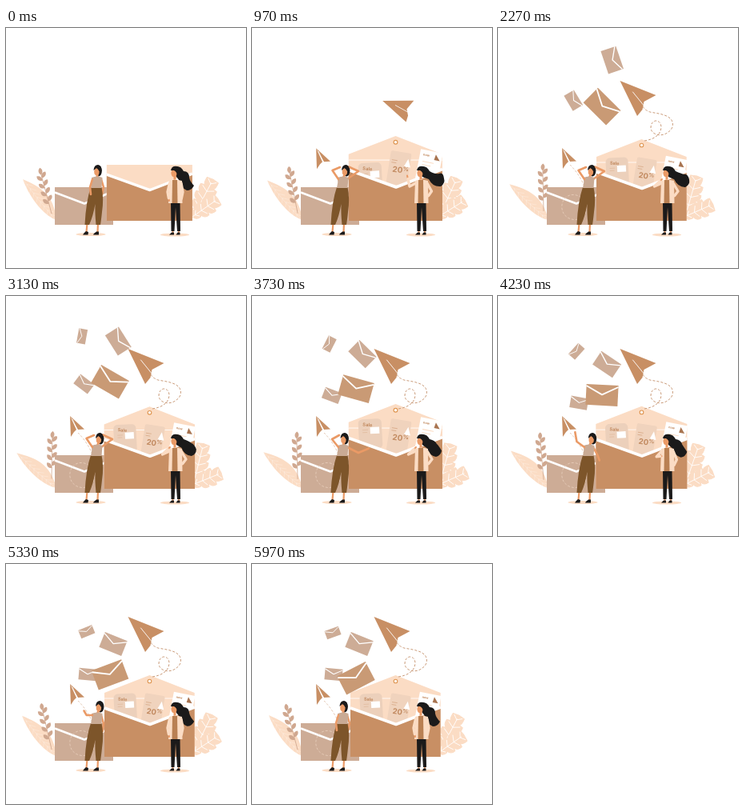
Recreate the animation shown at these times as an HTML page. Size 300 by 300 pixels, loop 6 s.

```html
<!DOCTYPE html>
<html lang="en">
<head>
<meta charset="utf-8">
<title>Mail campaign</title>
<style>
html, body { margin: 0; width: 100%; height: 100%; overflow: hidden; background: #fff; }
svg { display: block; width: 100%; height: 100%; }
text { font-family: Inter, "Open Sans", sans-serif; font-weight: 700; fill: #c28a60; }
</style>
</head>
<body>
<svg id="stage" viewBox="0 0 300 300"></svg>
<script>
const LOOP = 6000;
const TAN = '#c88f64', PALE = '#fbdcc4', DUSTY = '#cdac96', SKIN = '#ea9a66', INK = '#1b1a1a', BROWN = '#7d552a';
const BUTT = 'stroke-linecap="butt"';
const stage = document.getElementById('stage');

const clamp = v => Math.max(0, Math.min(1, v));
const ramp = (t, from, to) => {
  const v = clamp((t - from) / (to - from));
  return v * v * (3 - 2 * v);
};
const bump = (t, center, half) => ramp(t, center - half, center) - ramp(t, center, center + half);
const mix = (a, b, k) => a + (b - a) * k;
const blend = (a, b, k) => a.map((v, i) => mix(v, b[i], k));
const bezier = (a, b, c, d, s) => {
  const r = 1 - s;
  return r * r * r * a + 3 * r * r * s * b + 3 * r * s * s * c + s * s * s * d;
};

const fill = (d, color, extra = '') => `<path d="${d}" fill="${color}" ${extra}/>`;
// Extra attributes come first, so they win over the defaults.
const line = (d, color, width, extra = '') =>
  `<path ${extra} d="${d}" fill="none" stroke="${color}" stroke-width="${width}" stroke-linecap="round" stroke-linejoin="round"/>`;
const oval = (x, y, rx, ry, color) => `<ellipse cx="${x}" cy="${y}" rx="${rx}" ry="${ry}" fill="${color}"/>`;
const group = (transform, body, opacity = 1) => `<g transform="${transform}" opacity="${opacity}">${body}</g>`;

function plume(sway) {
  let ribs = '';
  for (let i = 1; i < 9; i++) {
    const x = 22 + i * 4.3, y = 190 + i * 5.4;
    ribs += `M${x} ${y}l7 2M${x} ${y}l-1 6`;
  }
  return group(`rotate(${-9.3 * sway} 62 240)`,
    fill('M21 189C44 199 60 209 63 240C50 236 31 216 21 189Z', PALE) +
    line('M21 189Q39 214 62 240' + ribs, '#fff', .4, 'opacity=".55"'));
}

function sprig(sway) {
  const color = '#d0a890';
  const leaf = (y, turn) => group(`translate(0 ${y}) rotate(${turn})`, fill('M0 0C-4 -3 -3 -7 0 -9C3 -7 3 -3 0 0Z', color));
  let leaves = leaf(-50, 4);
  for (let y = -13; y > -50; y -= 10) leaves += leaf(y, -42) + leaf(y - 3, 42);
  return group(`translate(57 ${mix(232, 228, sway)}) rotate(${mix(-15, 1, sway)})`, line('M0 0V-50', color, .8) + leaves);
}

function oakLeaf(length, width, lobes) {
  const step = length / lobes;
  const reach = i => width * Math.sin(Math.PI * (i + 1) / (lobes + 1.5));
  let right = '', left = '', veins = `M0 0V${-length * .9}`;
  for (let i = 0; i < lobes; i++) {
    const tip = reach(i), y = -step * (i + .9), notch = i < lobes - 1 ? tip * .55 : 0;
    const edge = side => `Q${side * tip * 1.1} ${y + step * .75} ${side * tip} ${y}L${side * notch} ${-step * (i + 1)}`;
    right += edge(1);
    left += edge(-1);
    veins += `M${-tip * .7} ${y + 1}L0 ${y + step * .5}L${tip * .7} ${y + 1}`;
  }
  return fill(`M0 0${right}L0 ${-length}ZM0 0${left}L0 ${-length}Z`, PALE, `stroke="${PALE}" stroke-linejoin="round"`) +
    line(veins, '#fff', .8);
}

const bush = sway =>
  group(`translate(234 236) rotate(${mix(28, 14, sway)})`, oakLeaf(53, 12, 5)) +
  group(`translate(233 236) rotate(${mix(55, 68, sway)})`, oakLeaf(39, 11, 4));

const smallEnvelope = () =>
  fill('M61 199H134V246H61Z', DUSTY) + line('M61 205.5L98 219.5L134 204', '#fff', 2.6, BUTT);

function cards(t, lift) {
  const slot = (delay, turn, x, body) =>
    group(`translate(0 ${44 * (1 - ramp(t, 250 + delay, 850 + delay)) - lift}) rotate(${turn} ${x} 176)`, body);
  return slot(350, -3, 149,
      '<rect x="135" y="162" width="28" height="36" rx="5" fill="#ecd0bb"/><rect x="149" y="172" width="11" height="8" fill="#fff"/>' +
      '<text x="140" y="170" font-size="5.6" transform="rotate(8 140 170)">Sale</text>' +
      line('M140 175h6M140 178h5', TAN, .5, 'opacity=".5"')) +
    slot(0, 9, 184,
      '<rect x="172" y="163" width="25" height="40" rx="2" fill="#f0d3bd"/>' +
      fill('M190 180l4-10 4 10Z', '#fff') + line('M175 174h6M175 177h5', TAN, .8, 'opacity=".6"') +
      '<text x="177" y="188" font-size="9.5">20<tspan dy="-3" font-size="7">%</tspan></text>') +
    slot(0, 11, 220,
      '<rect x="207" y="162" width="27" height="46" fill="#fff"/><text x="211" y="169" font-size="3.8">now</text>' +
      fill('M226 165L232 172H225Z', '#a87450') + line('M212 176h13M212 180h10', PALE, 1));
}

function bigEnvelope(t) {
  const pulse = bump(t, 970, 700) + bump(t, 3720, 800);
  const scale = .95 + .05 * ramp(t, 0, 500) + .04 * pulse;
  const open = ramp(t, 80, 560);
  const flap = group(`translate(0 168) scale(1 ${open})`,
    fill('M123 0V-7L179.5 -29L235.7 -7V0Z', PALE) +
    '<circle cx="179.5" cy="-21.5" r="2.3" fill="#fff" stroke="#df9652" stroke-width="1.1"/>');
  return group(`translate(179.5 241) scale(${scale}) translate(-179.5 -241)`,
    flap + fill('M123 167.3H235.7V241H123Z', PALE) +
    line('M123 168H235.7', '#fff', .8, `opacity="${open}"`) +
    group('', cards(t, 5 * pulse), open) +
    fill('M123 180L180 200.5L235.7 179V241H123Z', TAN) +
    line('M123 180L180 200.5L235.7 179', '#fff', 3.6, BUTT));
}

function trail(id, d, color, shown) {
  if (!shown) return '';
  return `<mask id="${id}" maskUnits="userSpaceOnUse" x="0" y="0" width="300" height="300">` +
    `<path d="${d}" pathLength="1" fill="none" stroke="#fff" stroke-width="4" stroke-dasharray="${shown} 2"/></mask>` +
    line(d, color, 1, `${BUTT} stroke-dasharray="3 2" mask="url(#${id})"`);
}

function bigPlane(t) {
  const s = ramp(t, 200, 1600);
  if (!s) return '';
  const x = bezier(184, 230, 115, 152.5, s), y = bezier(150, 96, 88, 66, s);
  const turn = 280 * (1 - s) * (.39 - s);
  return group(`translate(${x} ${y}) rotate(${turn}) scale(${mix(.2, 1, Math.sqrt(s))})`,
    fill('M0 0L45 18L30 26L28 36L21.5 44Z', TAN) + line('M16 14L29 30', '#fff', .9));
}

function smallPlane(t) {
  const s = ramp(t, 200, 1000);
  if (!s) return '';
  return group(`translate(${mix(106, 80, s)} ${mix(212, 150, s)}) rotate(${40 * (1 - s)}) scale(${mix(.3, 1, s)})`,
    fill('M0 0L18 16.5L10 17Z', TAN) + fill('M0 0L8 17L5 20L1 26Z', TAN) + line('M3 4L9 17L14 21', '#fff', .8));
}

// Each letter drifts from one [x, y, turn] to another.
const LETTERS = [
  { start: 2300, stop: 5700, w: 18.5, h: 11, color: DUSTY, from: [94, 44, -90], to: [101, 86, -20] },
  { start: 1900, stop: 5300, w: 30, h: 20, color: DUSTY, from: [143, 38, 73], to: [134, 100, 22] },
  { start: 1500, stop: 4800, w: 22, h: 14.5, color: DUSTY, from: [93, 83, 68], to: [102, 138, 5] },
  { start: 1700, stop: 6200, w: 40, h: 26, color: '#c99a75', from: [130, 96, 48], to: [130, 143, -28] },
];

function letter(t, { start, stop, w, h, color, from, to }) {
  const [x, y, turn] = blend(from, to, ramp(t, start, stop));
  const shown = ramp(t, start + 50, start + 330);
  return group(`translate(${x} ${y}) rotate(${turn}) scale(${mix(.6, 1, shown)})`,
    fill(`M${-w / 2} ${-h / 2}h${w}v${h}h${-w}Z`, color) +
    line(`M${-w / 2} ${-h * .42}L0 ${-h * .02}L${w / 2} ${-h * .42}`, '#fff', w / 22, BUTT), shown);
}

const limb = (sx, sy, ex, ey, hx, hy, color, width) => line(`M${sx} ${sy}L${ex} ${ey}L${hx} ${hy}`, color, width);

// Poses: head x, left elbow, left hand, right elbow, right hand.
const REST = [114, 105, 199, 106, 208, 122, 199, 120, 208];
const AMAZED = [116.5, 100.5, 178, 110, 174, 133, 179, 121, 173.5];
const ASKING = [115, 100, 179, 109, 174, 133, 196, 146, 190.5];
const REACHING = [118, 98, 183, 92.5, 169, 122, 200, 121, 210];

function leftWoman(t) {
  let pose = blend(REST, AMAZED, ramp(t, 100, 850));
  pose = blend(pose, ASKING, ramp(t, 3250, 3730));
  pose = blend(pose, REACHING, ramp(t, 3750, 4450));
  const [hx, ...arm] = blend(pose, REST, ramp(t, 5000, 5800));
  return oval(106, 258, 18.5, 2, PALE) +
    line('M101.5 244L100.5 255M115 244L114.5 255', SKIN, 2.2) +
    fill('M100 254L103 255L102.5 258.5H96Q97 256.5 100 254ZM113 254.5L116 254.5V258.5H109Q110 256.5 113 254.5Z', INK) +
    oval(hx + 1.5, 178.5, 4.4, 7, INK) +
    line(`M${hx} 181L114 188`, SKIN, 3) +
    limb(119, 189, ...arm.slice(4), SKIN, 2.6) +
    fill('M106 199H119.5Q122.5 213 120 230Q119 240 118 246H112.5Q111 230 111.5 220Q109 235 104 246H98.5Q100 216 106 199Z', BROWN) +
    fill('M107 187Q114 184 120.5 187L119.5 200H106Q108 193 107 187Z', '#c9aa94') +
    limb(108, 189, ...arm.slice(0, 4), SKIN, 2.6) +
    oval(hx - .6, 179.6, 3.2, 4.7, SKIN) +
    fill(`M${hx - 4.5} 178Q${hx - 4} 171 ${hx + 1} 171Q${hx + 6} 172 ${hx + 5} 179L${hx + 2.5} 179Q${hx + 1} 176 ${hx - 1} 175Z`, INK);
}

const HANGING = [202, 205, 204, 216, 221, 205, 218.5, 217];
const POINTING = [197, 198, 194, 184.5, 224.5, 204, 219, 212];
const THINKING = [195.5, 198, 205, 189, 225, 204, 219, 212];

function rightWoman(t) {
  const pose = blend(blend(HANGING, POINTING, ramp(t, 100, 900)), THINKING, ramp(t, 1150, 1700));
  const arm = blend(pose, HANGING, ramp(t, 3900, 4650));
  const lift = ramp(t, 100, 900) * (1 - ramp(t, 900, 5900));
  const p = (x0, y0, x1, y1) => `${mix(x0, x1, lift)} ${mix(y0, y1, lift)}`;
  const sleeve = (sx, a) => limb(sx, 194, ...a, SKIN, 2) +
    limb(sx, 194, a[0], a[1], mix(a[0], a[2], .7), mix(a[1], a[3], .7), PALE, 3.4);
  return oval(211, 258.5, 18, 2, PALE) +
    fill(`M207 178Q208 173 214 173Q219 173 222 179Q${p(229, 179, 229, 183)} ${p(229, 187, 234, 182)}` +
      `Q${p(230, 192, 239, 180)} ${p(235, 197, 240, 188)}Q${p(232, 203, 242, 194)} ${p(226, 203, 236, 198)}` +
      `Q${p(219, 200, 226, 199)} ${p(217, 191, 221, 189)}L213 186Z`, INK) +
    line('M208.5 250V256M216 250V256', SKIN, 1.8) +
    fill('M206 217H217.5L218 254H214L212 224L210.5 254H206.5Z', INK) +
    fill('M207 255.5H210V258.5H204ZM214.5 255.5H217.5V258.5H212.5Z', INK) +
    line('M211 183V191', SKIN, 3) +
    sleeve(219, arm.slice(4)) +
    fill('M204 191Q211 188 220 191L220.5 219H203Z', PALE) +
    fill('M208 190H214L214.5 219H207.5Z', '#b98053') +
    sleeve(204.5, arm.slice(0, 4)) +
    oval(210, 181.5, 3.6, 4.8, SKIN) +
    fill('M206 178Q207 172 214 173Q220 175 219 186L215 187Q214 180 210 178Z', INK);
}

function render(t) {
  const sway = (1 - Math.cos(2 * Math.PI * t / LOOP)) / 2;
  const drawn = ramp(t, 1000, 1700);
  stage.innerHTML = plume(sway) + sprig(sway) + bush(sway) + smallEnvelope() + bigEnvelope(t) +
    trail('loop', 'M183 141C196 139 204 133 204 123C203 114 192 113 191 124C191 136 211 138 218 124C222 108 199 107 190 105Q182 102 180 96', '#c99a78', drawn) +
    trail('swirl', 'M104 212C92 203 78 212 80 226C82 240 100 244 108 234C116 220 112 193 90 171', '#e3c8b5', drawn) +
    bigPlane(t) + smallPlane(t) + LETTERS.map(l => letter(t, l)).join('') + leftWoman(t) + rightWoman(t);
}

const began = performance.now();
function frame() {
  render((performance.now() - began) % LOOP);
  requestAnimationFrame(frame);
}
frame();
</script>
</body>
</html>
```
